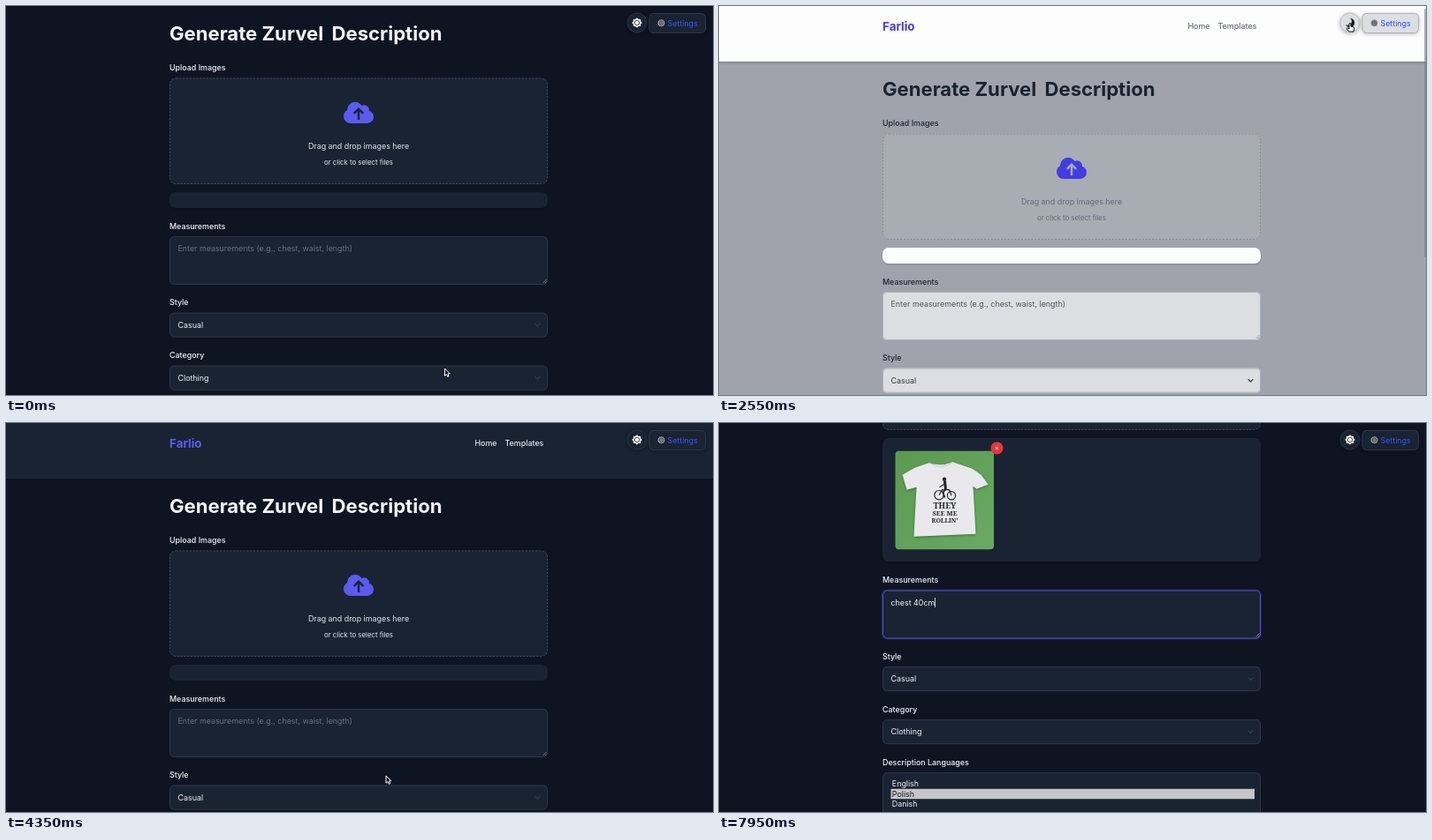
Recreate the animation shown at these times as an HTML page with a canvas. Size 800x441 px, loop 8000 ms.

```html
<!DOCTYPE html>
<html lang="en">
<head>
<meta charset="utf-8">
<title>Generate Description</title>
<style>
  html, body { margin: 0; width: 100%; height: 100%; overflow: hidden; background: #0f1423; }
  canvas { display: block; width: 800px; height: 441px; }
</style>
</head>
<body>
<canvas id="stage" width="800" height="441"></canvas>
<script>
const c = document.getElementById('stage').getContext('2d');
const W = 800, H = 441, LOOP = 8000;
const LEFT = 185, WIDTH = 428;
const TO_LIGHT = 2440, TO_DARK = 3014, IMAGE_AT = 5050, FOCUS_AT = 7100;
const FONT = 'Inter, "Liberation Sans", sans-serif';
const SERIF = '"Noto Serif", "Liberation Serif", serif';

const clamp = v => Math.max(0, Math.min(1, v));
const prog = (t, a, b) => clamp((t - a) / (b - a));
const outCubic = p => 1 - (1 - p) ** 3;
const inOut = p => p < .5 ? 4 * p ** 3 : 1 - (2 - 2 * p) ** 3 / 2;

// CSS "ease": cubic-bezier(.25, .1, .25, 1)
function ease(x) {
  let lo = 0, hi = 1, s = x;
  for (let i = 0; i < 16; i++) {
    s = (lo + hi) / 2;
    const bx = .75 * s * (1 - s) ** 2 + .75 * s * s * (1 - s) + s ** 3;
    if (bx < x) lo = s; else hi = s;
  }
  return .3 * s * (1 - s) ** 2 + 3 * s * s * (1 - s) + s ** 3;
}

const rgb = h => [1, 3, 5].map(i => parseInt(h.slice(i, i + 2), 16));
function mix(a, b, k) {
  const p = rgb(a), q = rgb(b);
  return `rgb(${p.map((v, i) => Math.round(v + (q[i] - v) * k)).join(',')})`;
}

function text(s, x, y, color, size = 8.9, weight = 400, align = 'left', family = FONT) {
  c.font = `${weight} ${size}px ${family}`;
  c.textAlign = align;
  c.fillStyle = color;
  c.fillText(s, x, y);
}

function box(x, y, w, h, r, fill, stroke, dash = []) {
  c.beginPath();
  c.roundRect(x, y, w, h, r);
  if (fill) { c.fillStyle = fill; c.fill(); }
  if (!stroke) return;
  c.beginPath();
  c.roundRect(x + .5, y + .5, w - 1, h - 1, r);
  c.setLineDash(dash);
  c.lineWidth = 1;
  c.strokeStyle = stroke;
  c.stroke();
  c.setLineDash([]);
}

function disc(x, y, r, fill) {
  c.beginPath();
  c.arc(x, y, r, 0, 7);
  c.fillStyle = fill;
  c.fill();
}

function ring(x, y, r, color, width) {
  c.beginPath();
  c.arc(x, y, r, 0, 7);
  c.lineWidth = width;
  c.strokeStyle = color;
  c.stroke();
}

function line(color, width, ...pts) {
  c.beginPath();
  pts.forEach(([x, y]) => c.lineTo(x, y));
  c.lineWidth = width;
  c.strokeStyle = color;
  c.stroke();
}

function shadow(blur, y, alpha, draw) {
  c.save();
  c.shadowColor = `rgba(0,0,0,${alpha})`;
  c.shadowBlur = blur;
  c.shadowOffsetY = y;
  draw();
  c.restore();
}

function star(x, y, n, r1, r2, fill) {
  c.beginPath();
  for (let i = 0; i < n * 2; i++) {
    const a = Math.PI * i / n, r = i % 2 ? r2 : r1;
    c.lineTo(x + r * Math.sin(a), y - r * Math.cos(a));
  }
  c.fillStyle = fill;
  c.fill();
}

function scrollAt(t) {
  if (t < 1400) return 63 + 175 * outCubic(prog(t, 750, 1220));
  if (t < 5000) return 238 * (1 - inOut(prog(t, 1400, 1980)));
  return 257 * outCubic(prog(t, 5900, 6600));
}

function barAlpha(t) {
  if (t < 750) return 0;
  if (t < 4000) return 1 - prog(t, 2450, 2700);
  return t < 5900 ? 0 : 1 - prog(t, 7050, 7300);
}

function theme(t) {
  const light = t >= TO_LIGHT && t < TO_DARK;
  const fade = d => t < TO_DARK ? ease(prog(t, TO_LIGHT, TO_LIGHT + d))
                                : 1 - ease(prog(t, TO_DARK, TO_DARK + d));
  const slow = fade(300), fast = fade(200);
  return {
    light,
    body: mix('#0f1423', '#f3f4f8', slow),
    drop: mix('#1a2332', '#f8fafc', slow),
    dash: mix('#3b475b', '#b4b8bf', slow),
    panel: light ? '#fdfdfe' : '#1a2332',
    field: mix('#1a2332', '#ffffff', fast),
    edge: mix('#2d3748', '#c3c7cf', fast),
    title: light ? '#1a2332' : '#f3f5f8',
    label: light ? '#1a2332' : '#f3f5f8',
    soft: mix('#e4e8ee', '#4b5568', fast),
    input: mix('#f3f5f8', '#111827', fast),
    hint: mix('#68717f', '#4b4f58', fast),
    chevron: mix('#313c4e', '#1f2937', fast),
    primary: light ? '#433ce0' : '#5b5bf0',
    link: mix('#3358f6', '#2a4fe6', fast)
  };
}

function cloud(x, y, fill, arrow) {
  c.fillStyle = fill;
  c.beginPath();
  [[-9, 4, 8], [-4, -3.2, 9], [6.2, -3, 5.8], [9.7, 4.7, 7.3]].forEach(([dx, dy, r]) => {
    c.moveTo(x + dx + r, y + dy);
    c.arc(x + dx, y + dy, r, 0, Math.PI * 2);
  });
  c.rect(x - 9, y - 2, 18.7, 14);
  c.fill();
  line(arrow, 2.4, [x, y + 8], [x, y - 4]);
  line(arrow, 2.4, [x - 5.2, y + .8], [x, y - 4.4], [x + 5.2, y + .8]);
}

function select(y, value, k) {
  box(LEFT, y, WIDTH, 28, 5, k.field, k.edge);
  text(value, 194.5, y + 17, k.input);
  line(k.chevron, 1.2, [598.7, y + 12.6], [601.5, y + 15.4], [604.3, y + 12.6]);
}

function photo(x, y) {
  c.save();
  c.translate(x, y);
  const g = c.createLinearGradient(0, 0, 111, 111);
  g.addColorStop(0, '#5a9a50');
  g.addColorStop(1, '#6aa964');
  box(0, 0, 111.5, 111.5, 4, g);
  shadow(3, 1, .35, () => {
    c.beginPath();
    c.moveTo(38, 13.5);
    c.quadraticCurveTo(52, 18, 65, 12.5);
    [[87, 20], [97, 27], [105, 38], [92, 43], [88, 40], [91, 94], [21, 97],
     [24, 41], [13, 44], [8, 27], [22, 19]].forEach(p => c.lineTo(...p));
    c.closePath();
    c.fillStyle = '#e9e9ed';
    c.fill();
  });
  c.beginPath();
  c.moveTo(38, 13.5);
  c.quadraticCurveTo(52, 23, 65, 12.5);
  c.lineWidth = 1;
  c.strokeStyle = '#c9cacf';
  c.stroke();

  const ink = '#23252a';
  ring(49.5, 50, 5.2, ink, 1.2);
  ring(63.5, 50.5, 4.6, ink, 1.2);
  line(ink, 1.2, [49.5, 50], [53, 44], [61, 44], [63.5, 50.5]);
  line(ink, 3, [56, 34], [57, 44]);
  line(ink, 1.8, [57, 43], [54, 47], [56, 53]);
  line(ink, 1.2, [56, 37], [50, 41]);
  disc(55.5, 32, 2.2, ink);
  text('THEY', 56, 65.5, ink, 9.3, 600, 'center', SERIF);
  text('SEE ME', 56, 73.5, ink, 7.5, 600, 'center', SERIF);
  text("ROLLIN'", 56, 81, ink, 7, 600, 'center', SERIF);
  c.restore();
}

function measurements(t, y, k) {
  const focus = t >= FOCUS_AT;
  if (focus) box(LEFT - 1, y - 1, WIDTH + 2, 57, 6, 'rgba(91,91,240,.25)');
  box(LEFT, y, WIDTH, 55, 5, k.field, focus ? '#5150dc' : k.edge);
  line('#8b919b', .8, [607.5, y + 53], [611.5, y + 49]);
  line('#8b919b', .8, [610, y + 53], [611.5, y + 51.5]);
  const count = t < 7300 ? 0 : t < 7450 ? 1 : Math.min(10, 2 + Math.floor((t - 7450) / 58));
  const typed = 'chest 40cm'.slice(0, count);
  if (count) text(typed, 194.5, y + 17, k.input);
  else text('Enter measurements (e.g., chest, waist, length)', 194.5, y + 17, k.hint);
  if (focus) {
    c.font = `400 8.9px ${FONT}`;
    c.fillStyle = k.input;
    c.fillRect(194.5 + c.measureText(typed).width, y + 8.5, .8, 11);
  }
}

function page(t, k) {
  const full = t >= IMAGE_AT;
  shadow(3, 1, .3, () => box(0, 0, W, 63, 0, k.panel));
  text('Farlio', LEFT, 27.5, k.primary, 13.4, 700);
  text('Home', 530.5, 26, k.soft, 8.9, 500);
  text('Templates', 564.5, 26, k.soft, 8.9, 500);

  text('Generate Zurvel', LEFT, 102, k.title, 22.1, 700);
  text('Description', 493.5, 102, k.title, 22.1, 700, 'right');

  text('Upload Images', LEFT, 136, k.label, 8.9, 500);
  box(LEFT, 144.5, WIDTH, 120.5, 7, k.drop, k.dash, [2.2, 1.6]);
  cloud(399, 184, k.primary, k.drop);
  text('Drag and drop images here', 399, 225.2, k.soft, 8.9, 400, 'center');
  text('or click to select files', 399, 242.8, k.soft, 7.8, 400, 'center');

  shadow(2, 1, .2, () => box(LEFT, 274, WIDTH, full ? 140 : 18, 7, k.panel));
  if (full) {
    photo(199.5, 288.7);
    disc(314.5, 285.5, 7, '#e5383b');
    line('#fff', .9, [313, 284], [316, 287]);
    line('#fff', .9, [316, 284], [313, 287]);
  }

  c.save();
  c.translate(0, full ? 122.5 : 0);
  text('Measurements', LEFT, 315.6, k.label, 8.9, 500);
  measurements(t, 324, k);
  text('Style', LEFT, 402.4, k.label, 8.9, 500);
  select(410.6, 'Casual', k);
  text('Category', LEFT, 462.3, k.label, 8.9, 500);
  select(470.6, 'Clothing', k);
  text('Description Languages', LEFT, 522.3, k.label, 8.9, 500);
  box(LEFT, 530.7, WIDTH, 60.5, 5, k.field, k.edge);
  c.fillStyle = '#c6c5c8';
  c.fillRect(194.5, 549.3, 411.5, 11.4);
  text('English', 195.8, 546.8, k.input);
  text('Polish', 195.8, 558.2, '#15181f');
  text('Danish', 195.8, 569.6, k.input);
  text('Hold Ctrl/Cmd to select multiple languages', LEFT, 602, k.soft, 7.8);
  box(LEFT, 619, 118.5, 28, 5, k.primary);
  text('Generate Description', 244.2, 636.2, '#fff', 8.9, 500, 'center');
  c.restore();
}

function controls(k) {
  shadow(4, 1, .3, () => disc(714, 19, 11.5, k.field));
  ring(714, 19, 11, k.edge, .7);
  if (k.light) {
    disc(714, 19, 5.2, '#14181f');
    disc(711.6, 17.4, 4.3, k.field);
  } else {
    star(714, 19, 8, 5.8, 4.4, '#fff');
    ring(714, 19, 2.7, '#1a2332', .8);
  }
  shadow(4, 1, .25, () => box(727.5, 8, 64.5, 23, 5, k.field));
  box(727.5, 8, 64.5, 23, 5, null, k.edge);
  star(741.5, 19.3, 12, 4.4, 3.7, '#8d9199');
  ring(741.5, 19.3, 2.3, '#4b5059', .9);
  disc(741.5, 19.3, 1, '#4b5059');
  text('Settings', 748.5, 22.6, k.link);
}

function scrollbar(t, y, light) {
  const a = barAlpha(t);
  if (!a) return;
  const doc = t >= IMAGE_AT ? 801.5 : 679;
  c.globalAlpha = a;
  box(798, y * H / doc + 3, 2, H * H / doc - 5, 1, light ? '#7d8088' : '#737782');
  c.globalAlpha = 1;
}

// time, x, y
const moves = [
  [50, 496.5, 411], [250, 476, 402], [750, 476, 402], [1150, 605.5, 357.5],
  [1500, 605.5, 357.5], [2250, 714, 20], [3250, 714, 20], [3650, 410, 238],
  [4350, 430, 400], [4850, 448, 300], [5100, 448, 300], [5700, 440, 284.5],
  [6750, 440, 284.5], [7000, 330, 208]
];

function pointerAt(t) {
  const i = moves.findIndex(m => m[0] > t);
  if (i === 0) return moves[0].slice(1);
  if (i < 0) return moves[moves.length - 1].slice(1);
  const [a, x, y] = moves[i - 1], [b, u, v] = moves[i];
  const p = inOut(prog(t, a, b));
  return [x + (u - x) * p, y + (v - y) * p];
}

const arrow = new Path2D('M0 0V8.2L1.9 6.5L3.2 9.3L4.6 8.7L3.4 5.9H5.8Z');
const hand = new Path2D('M-1 0Q0-1 1 0V3.2L4 4Q5 4.4 4.7 6L4 9H-1.2L-4 5.6Q-3.6 4.4-2.3 5.2L-1 6Z');

function pointer(t, scroll) {
  if (t > 3950 && t <= 4350 || t > 7300) return;
  const [x, y] = pointerAt(t);
  const inColumn = x > LEFT && x < LEFT + WIDTH, py = y + scroll;
  const onToggle = Math.hypot(x - 714, y - 19) < 12;
  const onDrop = inColumn && py > 144 && py < 265;
  const top = t >= IMAGE_AT ? 446.5 : 324;
  c.save();
  c.translate(x, y);
  if (inColumn && py > top && py < top + 55) {
    line('#e8eaee', .9, [-1.5, -4.5], [0, -4], [1.5, -4.5]);
    line('#e8eaee', .9, [0, -4], [0, 4]);
    line('#e8eaee', .9, [-1.5, 4.5], [0, 4], [1.5, 4.5]);
  } else {
    const onHand = onToggle || onDrop, shape = onHand ? hand : arrow;
    c.lineWidth = 1;
    c.strokeStyle = onHand ? '#111' : '#fff';
    c.fillStyle = onHand ? '#fff' : '#0a0c12';
    c.fill(shape);
    c.stroke(shape);
  }
  c.restore();
}

function draw(t) {
  const k = theme(t), scroll = scrollAt(t);
  c.fillStyle = k.body;
  c.fillRect(0, 0, W, H);
  c.save();
  c.translate(0, -scroll);
  page(t, k);
  c.restore();
  controls(k);
  scrollbar(t, scroll, k.light);
  pointer(t, scroll);
}

const start = performance.now();
function tick() {
  draw((performance.now() - start) % LOOP);
  requestAnimationFrame(tick);
}
tick();
</script>
</body>
</html>
```
